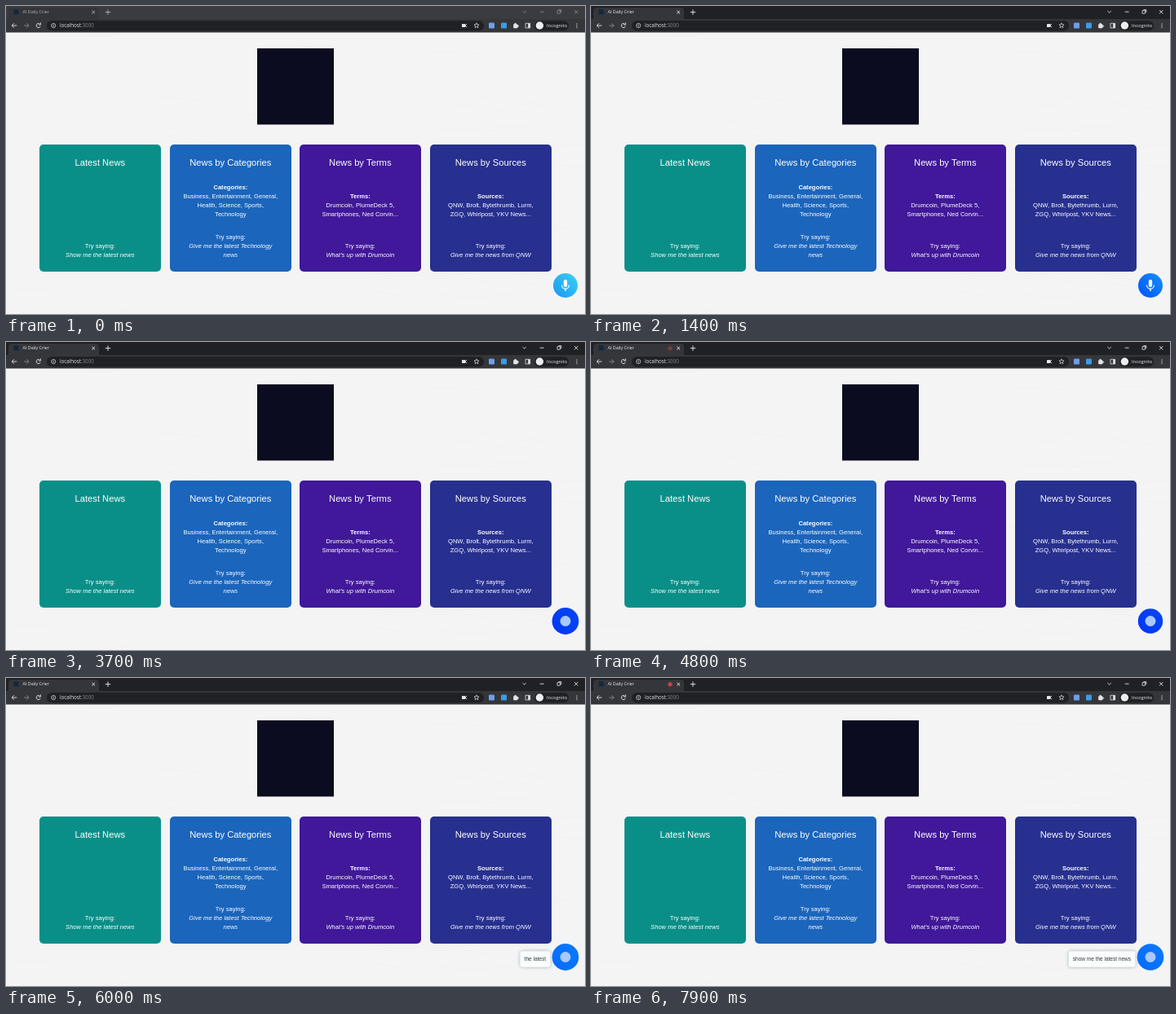
An HTML page with a canvas for the animation above (8 s loop, 710x378 px).

```html
<!DOCTYPE html>
<html lang="en">
<head>
<meta charset="utf-8">
<title>AI Daily Crier</title>
<style>
html, body { margin: 0; width: 100%; height: 100%; overflow: hidden; background: #f4f4f5; }
canvas { display: block; width: 710px; height: 378px; }
</style>
</head>
<body>
<canvas id="stage"></canvas>
<script>
const W = 710, H = 378, LOOP = 8000, STEP = 100;
const FOCUS = 1400, LISTEN = 3100;
const SANS = '"Liberation Sans", Arial, sans-serif';
const UI = '"Open Sans", "Noto Sans", sans-serif';
const INK = '#e4e5e8', DIM = '#85888d', BAR = '#35363a', DARK = '#202124';

const canvas = document.getElementById('stage');
const ctx = canvas.getContext('2d');
const dpr = window.devicePixelRatio || 1;
canvas.width = W * dpr;
canvas.height = H * dpr;
ctx.scale(dpr, dpr);

const cards = [
  { color: '#0a8f88', title: 'Latest News', list: [], say: ['Show me the latest news'] },
  { color: '#1b65bc', title: 'News by Categories', head: 'Categories:',
    list: ['Business, Entertainment, General,', 'Health, Science, Sports,', 'Technology'],
    say: ['Give me the latest Technology', 'news'] },
  { color: '#401899', title: 'News by Terms', head: 'Terms:',
    list: ['Drumcoin, PlumeDeck 5,', 'Smartphones, Ned Corvin...'], say: ["What's up with Drumcoin"] },
  { color: '#27308f', title: 'News by Sources', head: 'Sources:',
    list: ['QNW, Brolt, Bytethrumb, Lurm,', 'ZGQ, Whirlpost, YKV News...'],
    say: ['Give me the news from QNW'] }
];

function ease(t, from, to) {
  const k = Math.min(1, Math.max(0, (t - from) / (to - from)));
  return k * k * (3 - 2 * k);
}

const mix = (a, b, k) => a + (b - a) * k;
const mixRgb = (a, b, k) => a.map((v, i) => Math.round(mix(v, b[i], k)));

function box(x, y, w, h, r, color) {
  ctx.fillStyle = color;
  ctx.beginPath();
  ctx.roundRect(x, y, w, h, r);
  ctx.fill();
}

function dot(x, y, r, color) {
  ctx.fillStyle = color;
  ctx.beginPath();
  ctx.arc(x, y, r, 0, Math.PI * 2);
  ctx.fill();
}

function stroke(color, width, draw) {
  ctx.strokeStyle = color;
  ctx.lineWidth = width;
  ctx.beginPath();
  draw();
  ctx.stroke();
}

function line(x1, y1, x2, y2, color, width = 0.9) {
  stroke(color, width, () => { ctx.moveTo(x1, y1); ctx.lineTo(x2, y2); });
}

function ring(x, y, r, color, width = 0.9, from = 0, to = Math.PI * 2) {
  stroke(color, width, () => ctx.arc(x, y, r, from, to));
}

function outline(x, y, size, color) {
  stroke(color, 0.8, () => ctx.rect(x, y, size, size));
}

function cross(x, y, r, color) {
  line(x - r, y - r, x + r, y + r, color);
  line(x - r, y + r, x + r, y - r, color);
}

// Two strokes meeting at (x, y), opening towards the given angle.
function chevron(x, y, size, angle, color) {
  for (const a of [angle - Math.PI / 4, angle + Math.PI / 4])
    line(x, y, x + size * Math.cos(a), y + size * Math.sin(a), color);
}

function arrow(x, y, dir, color) {
  line(x - 3, y, x + 3, y, color);
  chevron(x + 3 * dir, y, 4, dir > 0 ? Math.PI : 0, color);
}

function star(x, y, r, color) {
  stroke(color, 0.7, () => {
    for (let i = 0; i < 10; i++) {
      const a = i * Math.PI / 5 - Math.PI / 2, q = i % 2 ? r * 0.45 : r;
      ctx.lineTo(x + q * Math.cos(a), y + q * Math.sin(a));
    }
    ctx.closePath();
  });
}

function text(str, x, y, font, color, align = 'left') {
  ctx.font = font;
  ctx.fillStyle = color;
  ctx.textAlign = align;
  ctx.fillText(str, x, y);
}

function drawTabs(t) {
  const active = t >= FOCUS, y = 7.2;
  const ink = active ? INK : DIM, label = active ? '#eeeff0' : '#b4b6b9';
  box(0, 0, W, 16, 0, active ? DARK : '#3a3c40');
  box(3, 2, 111, 16, 4, BAR);
  box(9.5, 4.2, 6, 6, 0.5, '#102a3c');
  text('AI Daily Crier', 20.5, 9.3, '5.4px ' + UI, label);
  cross(107.2, 7.6, 1.8, label);
  line(121.8, 7.6, 128.2, 7.6, label);
  line(125, 4.4, 125, 10.8, label);
  chevron(635.6, 8.2, 3, -Math.PI / 2, ink);
  line(654.8, y, 659.6, y, ink);
  outline(676, 5.7, 3.5, ink);
  line(677.4, 4.6, 680.8, 4.6, ink);
  line(680.8, 4.6, 680.8, 8, ink);
  cross(699.2, y, 2.2, ink);
  drawRecording(t);
}

function drawRecording(t) {
  const pulse = 0.25 * (1 - Math.cos((t - 3700) / 1100 * Math.PI));
  ctx.globalAlpha = t < 3700 ? 0 : mix(pulse, 1, ease(t, 6000, 7000));
  ring(97, 7.7, 2.4, '#d9474a');
  dot(97, 7.7, 1.5, '#ee5350');
  ctx.globalAlpha = 1;
}

function drawToolbar() {
  const y = 24;
  box(0, 16, W, 17, 0, BAR);
  box(50, 18, 536, 12.4, 6.2, DARK);
  arrow(10.2, y, -1, INK);
  arrow(25, y, 1, DIM);
  ring(39.8, y, 2.6, INK, 0.9, 0.35, 5.5);
  chevron(42.4, 23, 2.6, -Math.PI * 0.75, INK);
  ring(58.2, y, 2.6, INK, 0.7);
  line(58.2, 22.4, 58.2, 25.5, INK, 0.7);
  text('localhost', 66, 26.2, '6.2px ' + UI, INK);
  text(':3000', 66 + ctx.measureText('localhost').width, 26.2, '6.2px ' + UI, DIM);

  box(559, 22, 4.4, 4, 0.6, INK);
  chevron(563, y, 3, 0, INK);
  star(577, y, 3.2, INK);
  box(592, 20.6, 7, 7, 1, '#6f9de8');
  box(607, 20.6, 7, 7, 1, '#3d9be0');
  box(622.2, 22.2, 5.2, 5, 0.6, INK);
  dot(624.6, 21.9, 1.2, INK);
  dot(627.6, 24.6, 1.2, INK);
  outline(637, 21.3, 5.6, INK);
  box(640.2, 21.3, 2.4, 5.6, 0, INK);
  box(648, 18.2, 42, 12, 6, DARK);
  dot(654.4, y, 4.7, '#eceef0');
  text('Incognito', 663, 26.1, '5.8px ' + UI, '#eceef0');
  for (let i = -1; i < 2; i++) dot(700, y + i * 2.2, 0.65, INK);
}

function drawPage() {
  box(0, 32.6, W, H, 0, '#f4f4f5');
  let seed = 7;
  const rnd = () => (seed = seed * 16807 % 2147483647) / 2147483647;
  for (let i = 0; i < 45; i++) {
    const x = rnd() * W, y = 36 + rnd() * 340, len = 30 + rnd() * 90;
    line(x, y, x + len, y + len * (rnd() - 0.3) * 0.3, i % 2 ? '#f8f8f9' : '#f0f0f1', 0.7);
  }
  box(308, 52, 94, 93.5, 0, '#0b0c1f');
  cards.forEach((c, i) => drawCard(c, Math.round(41 + i * 159.7)));
}

function drawCard(c, x) {
  const mid = x + 74.3, row = 11, last = 305;
  const put = (str, y, style = '') =>
    text(str, mid, y + 2.7, style + ' 7.6px ' + SANS, '#fff', 'center');
  box(x, 170, 149, 156, 5, c.color);
  text(c.title, mid, 196, '11.2px ' + SANS, '#fff', 'center');
  const top = 255 - row * (c.list.length - 1);
  if (c.head) put(c.head, top - row, 'bold');
  c.list.forEach((s, i) => put(s, top + row * i));
  const first = last - row * (c.say.length - 1);
  put('Try saying:', first - row);
  c.say.forEach((s, i) => put(s, first + row * i, 'italic'));
}

function heard(t) {
  if (t < 5800) return '';
  if (t < 6700) return 'the latest news'.split(' ').slice(0, t < 5900 ? 1 : t < 6300 ? 2 : 3).join(' ');
  return 'show me the latest news';
}

function drawBubble(t) {
  const said = heard(t);
  if (!said) return;
  ctx.font = '6.5px ' + SANS;
  const w = ctx.measureText(said).width;
  ctx.save();
  ctx.shadowColor = 'rgba(60,90,100,.45)';
  ctx.shadowBlur = 4 * dpr;
  box(662 - w - 5.2, 335.2, w + 10.8, 19.6, 3, '#fbfcfc');
  ctx.restore();
  text(said, 662, 347.3, '6.5px ' + SANS, '#2b3a40', 'right');
}

function drawButton(t) {
  const cyan = [42, 180, 242], blue = [8, 114, 252], royal = [4, 62, 243];
  const listening = t >= LISTEN;
  const idle = mixRgb(cyan, blue, ease(t, 0, 900));
  const awake = mixRgb(royal, blue, ease(t, 4800, 6000));
  const base = mixRgb(idle, awake, ease(t, 3000, 3700));
  const hover = ease(t, 1500, 1700);
  const r = listening ? 15.8 + 0.6 * Math.cos((t - 3700) / 1100 * Math.PI) : 15 + 1.5 * hover;
  const x = 686, y = 343 - 0.5 * hover;

  // The idle button shades from lower left to upper right.
  const spread = 22 * (1 - 0.75 * ease(t, 3000, 3700));
  const shade = d => `rgb(${base[0] + d / 2},${base[1] + d},${base[2]})`;
  const g = ctx.createLinearGradient(x - r, y + r, x + r, y - r);
  g.addColorStop(0.15, shade(-spread));
  g.addColorStop(0.85, shade(spread));
  dot(x, y, r, g);
  if (listening) dot(x, y, 6.5, '#a9c8fb');
  else drawMic(x, y, r / 15);
}

function drawMic(x, y, s) {
  ctx.save();
  ctx.translate(x, y);
  ctx.scale(s, s);
  box(-2.2, -7.2, 4.4, 9.2, 2.2, '#fff');
  ring(0, -0.4, 4.5, '#fff', 1.2, 0, Math.PI);
  line(0, 4, 0, 7, '#fff', 1.4);
  ctx.restore();
}

function frame(now) {
  const t = Math.floor(now % LOOP / STEP) * STEP;
  drawTabs(t);
  drawToolbar();
  drawPage();
  drawBubble(t);
  drawButton(t);
  requestAnimationFrame(frame);
}
requestAnimationFrame(frame);
</script>
</body>
</html>
```
